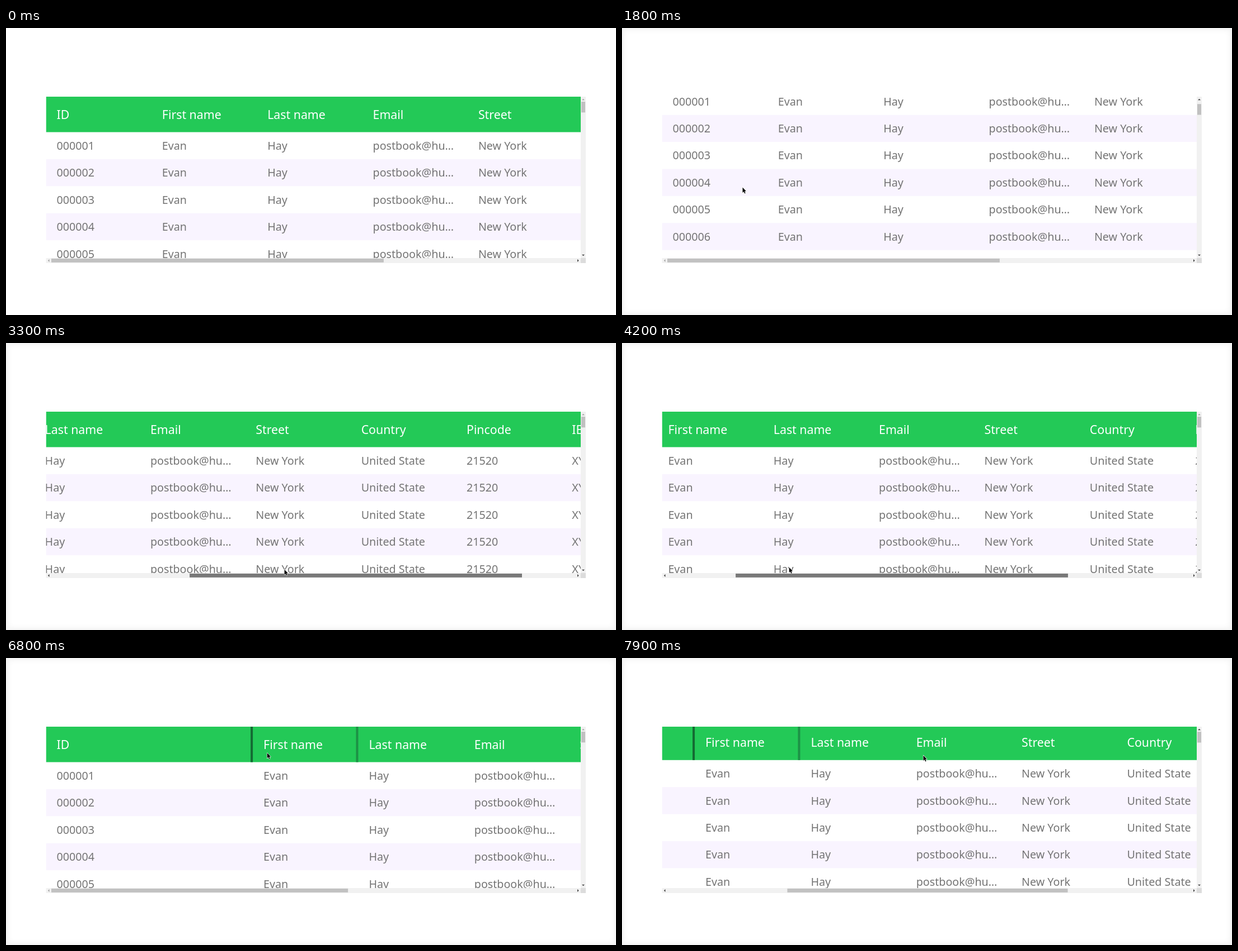
Animation, 1090 px wide and 514 px high, one loop 8000 ms. Source, as an HTML page with a canvas:

```html
<!DOCTYPE html>
<html lang="en">
<head>
<meta charset="utf-8">
<title>Resizable table</title>
<style>
  html, body { margin: 0; width: 100%; height: 100%; overflow: hidden; background: #fff; }
  canvas { display: block; }
  #edge { position: absolute; inset: 0; box-shadow: inset 0 0 10px 4px rgba(0, 0, 0, .05); }
</style>
</head>
<body>
<canvas id="stage" width="1090" height="514"></canvas>
<div id="edge"></div>
<script>
const ctx = document.getElementById('stage').getContext('2d');
const edge = document.getElementById('edge');

const LOOP = 8000, STEP = 100;
const VIEW = { x: 71.5, y: 123, w: 955.5, h: 289 };
const RIGHT = VIEW.x + VIEW.w, BOTTOM = VIEW.y + VIEW.h;
const BAR = 9, COL = 188.35, HEAD = 63.5, ROW = 48.4, PAD = 19, ROWS = 14;

const columns = [
  ['ID', n => String(n).padStart(6, '0')],
  ['First name', () => 'Evan'],
  ['Last name', () => 'Hay'],
  ['Email', () => 'postbook@hu…'],
  ['Street', () => 'New York'],
  ['Country', () => 'United State'],
  ['Pincode', () => '21520'],
  ['IBAN', () => 'XYZ12345']
];
const MAX_X = columns.length * COL - VIEW.w;

// Progress from 0 to 1 between two times: even, then eased
const ramp = (t, from, to) => Math.min(1, Math.max(0, (t - from) / (to - from)));
const ease = (t, from, to) => {
  const p = ramp(t, from, to);
  return p * p * (3 - 2 * p);
};

const scrollX = t =>
  MAX_X * (ease(t, 3000, 3460) - ease(t, 3800, 4470)) + 409 * ease(t, 7300, 7900);
const scrollY = t =>
  207 * Math.sin(Math.PI * ramp(t, 1100, 1900)) * (t < 1900) + 3.7 * ease(t, 7300, 7900);
const widening = t => 279.2 * ramp(t, 6430, 7000);

// Pointer moves: start, end, x, y
const moves = [
  [600, 800, 215, 285],
  [2200, 2900, 210, 411],
  [3000, 3500, 653, 402],
  [3800, 4400, 174, 401],
  [4600, 5200, 252, 154],
  [5200, 5600, 260, 155],
  [5800, 6100, 261, 157],
  [6400, 7000, 538, 174]
];

function pointerAt(t) {
  let x = 128, y = 290;
  for (const [from, to, endX, endY] of moves) {
    const p = ease(t, from, to);
    x += (endX - x) * p;
    y += (endY - y) * p;
  }
  return [x, y];
}

function box(color, x, y, w, h) {
  ctx.fillStyle = color;
  ctx.fillRect(x, y, w, h);
}

function polygon(points, x, y) {
  ctx.beginPath();
  points.forEach(([px, py]) => ctx.lineTo(x + px, y + py));
  ctx.closePath();
}

function label(text, x, y, size, color) {
  ctx.font = `${size}px "Noto Sans", sans-serif`;
  ctx.fillStyle = color;
  ctx.fillText(text, x, y);
}

function drawTable(sx, sy, extra, hover, active) {
  ctx.save();
  ctx.beginPath();
  ctx.rect(VIEW.x, VIEW.y, VIEW.w, VIEW.h);
  ctx.clip();

  const top = VIEW.y - sy;
  const left = i => VIEW.x - sx + i * COL + (i ? extra : 0);
  const rowTop = n => top + HEAD + (n - 1) * ROW;

  box('#23c957', VIEW.x, top, VIEW.w, HEAD);
  for (let n = 2; n <= ROWS; n += 2) box('#f9f4ff', VIEW.x, rowTop(n), VIEW.w, ROW);

  const divider = (col, color) => box(color, left(col + 1) - 4, top, 4, HEAD);
  if (hover >= 0) divider(hover, '#1d9146');
  if (active) divider(0, '#146a33');

  columns.forEach(([title, cell], i) => {
    const x = left(i) + PAD;
    label(title, x, top + 39.5, 21.3, '#fff');
    for (let n = 1; n <= ROWS; n++) label(cell(n), x, rowTop(n) + 31.4, 19.7, '#747474');
  });
  ctx.restore();
}

function arrow(x, y, angle, enabled) {
  ctx.save();
  ctx.translate(x, y);
  ctx.rotate(angle);
  ctx.fillStyle = enabled ? '#404040' : '#a3a3a3';
  polygon([[-2.5, 1.3], [0, -1.3], [2.5, 1.3]], 0, 0);
  ctx.fill();
  ctx.restore();
}

function drawBars(sx, sy, extra, thumb) {
  box('#f1f1f1', RIGHT, VIEW.y, BAR, VIEW.h);
  box('#f1f1f1', VIEW.x, BOTTOM, VIEW.w, BAR);
  box('#dcdcdc', RIGHT, BOTTOM, BAR, BAR);

  const total = columns.length * COL + extra;
  const scale = (VIEW.w - 2 * BAR - 1) / total;
  box(thumb, VIEW.x + BAR + 0.5 + sx * scale, BOTTOM + 1, VIEW.w * scale, 6.8);
  box('#c1c1c1', RIGHT + 1, VIEW.y + BAR + sy * 0.053, 7, 19.3);

  const midX = RIGHT + BAR / 2, midY = BOTTOM + BAR / 2;
  arrow(midX, VIEW.y + 5, 0, sy > 0);
  arrow(midX, BOTTOM - 5, Math.PI, true);
  arrow(VIEW.x + 4.7, midY, -Math.PI / 2, sx > 0);
  arrow(RIGHT - 4.7, midY, Math.PI / 2, sx < total - VIEW.w - 1);
}

function drawPointer(x, y) {
  polygon([[0.5, 0.5], [0.5, 10], [2.6, 8], [4.2, 11.4], [5.6, 10.8], [4.1, 7.4], [6.8, 7.2]], x, y);
  ctx.lineJoin = 'round';
  ctx.lineWidth = 1.2;
  ctx.strokeStyle = '#fff';
  ctx.stroke();
  ctx.fillStyle = '#000';
  ctx.fill();
}

function thumbColor(t) {
  if (t >= 2900 && t < 4700) return '#787878';
  return t === 2800 || t === 4700 ? '#a8a8a8' : '#c1c1c1';
}

function hoverColumn(t) {
  if (t >= 6100) return 1;
  return t >= 5000 ? 0 : -1;
}

function draw(now) {
  const t = Math.floor((now % LOOP) / STEP) * STEP;
  const sx = scrollX(t), sy = scrollY(t), extra = widening(t);
  const recording = t >= 400;

  box('#fff', 0, 0, 1090, 514);
  drawTable(sx, sy, extra, hoverColumn(t), t >= 6000);
  drawBars(sx, sy, extra, thumbColor(t));
  if (recording) drawPointer(...pointerAt(t));
  edge.style.visibility = recording ? 'visible' : 'hidden';
}

const start = performance.now();
function tick() {
  draw(performance.now() - start);
  requestAnimationFrame(tick);
}
tick();
</script>
</body>
</html>
```
